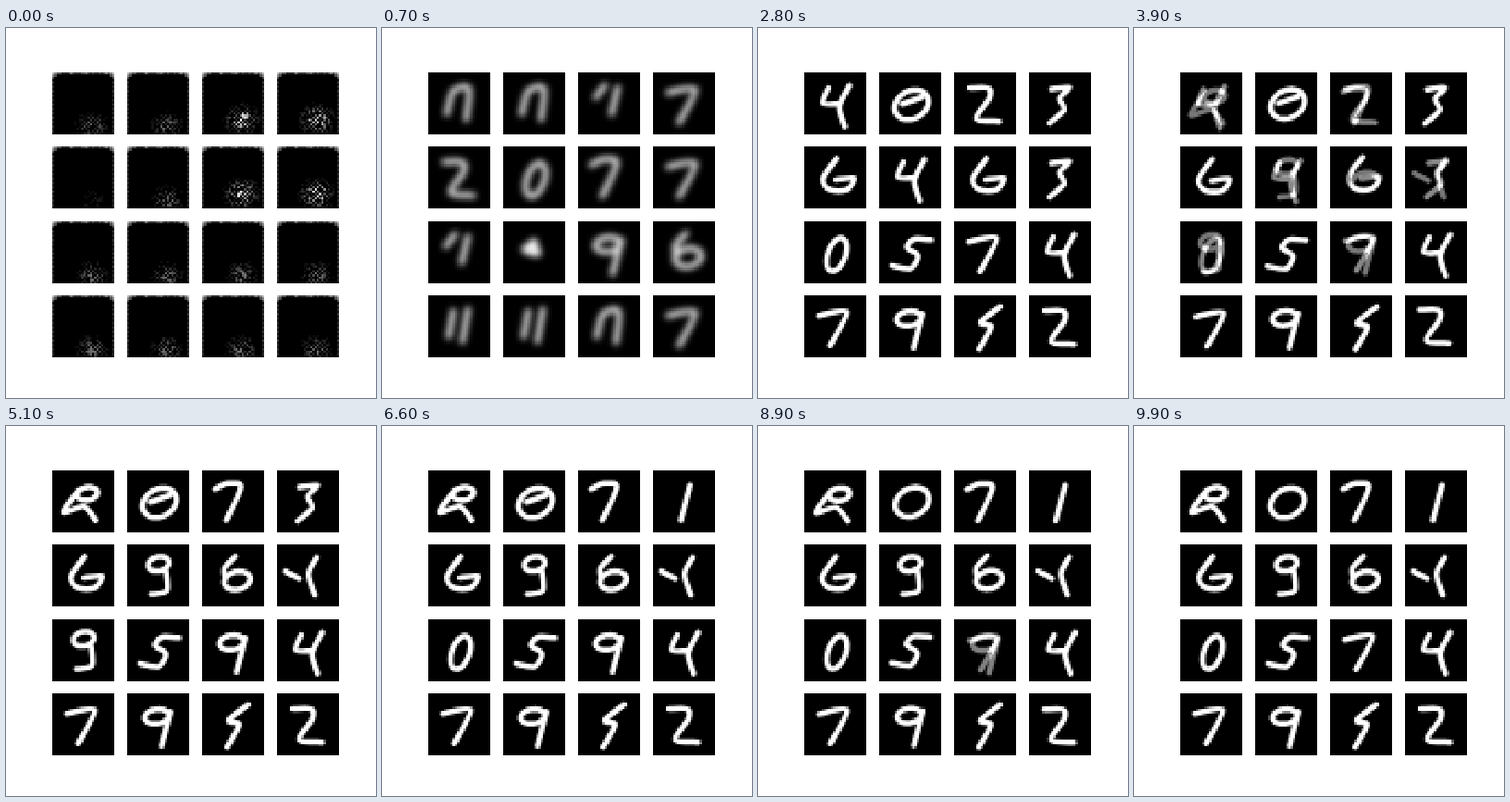
An HTML page with a canvas that plays this animation: 400x400 px, repeating every 10000 ms.

```html
<!DOCTYPE html>
<html lang="en">
<head>
<meta charset="utf-8">
<title>Generated digits</title>
<style>
  html, body { margin: 0; width: 100%; height: 100%; overflow: hidden; background: #fff; }
  canvas { display: block; width: 400px; height: 400px; }
</style>
</head>
<body>
<canvas id="stage" width="400" height="400"></canvas>
<script>
const LOOP = 10000, STEP = 100, CELLS = 28, SIZE = 67;
const stage = document.getElementById('stage').getContext('2d');
const cell = document.createElement('canvas');
cell.width = cell.height = CELLS;
const ctx = cell.getContext('2d');

// Smooth stroke through a few points.
function line(...n) {
  const p = [], path = new Path2D();
  while (n.length) p.push(n.splice(0, 2));
  path.moveTo(...p[0]);
  for (let i = 0; i < p.length - 1; i++) {
    const a = p[i - 1] || p[i], b = p[i], c = p[i + 1], d = p[i + 2] || c;
    path.bezierCurveTo(
      b[0] + (c[0] - a[0]) / 7, b[1] + (c[1] - a[1]) / 7,
      c[0] - (d[0] - b[0]) / 7, c[1] - (d[1] - b[1]) / 7, c[0], c[1]);
  }
  return path;
}

// Ellipse with a handwritten slant.
function ring(cx, cy, rx, ry) {
  const path = new Path2D();
  for (let i = 0; i <= 40; i++) {
    const a = i * Math.PI / 20, y = ry * Math.sin(a);
    path.lineTo(cx + rx * Math.cos(a) - .25 * y, cy + y);
  }
  return path;
}

const shapes = {};
function define(name, ...strokes) {
  shapes[name] = new Path2D();
  strokes.forEach(s => shapes[name].addPath(s));
}

define('0', ring(35, 36, 10, 18));
define('O', ring(35, 35, 18, 16));
define('8', ring(35, 35, 18, 16), line(25, 34, 46, 27));
define('Q', ring(38, 25, 11, 7), line(28, 22, 12, 45, 34, 39, 47, 54));
define('4', line(26, 17, 20, 33, 36, 34), line(49, 14, 38, 37, 44, 59));
define('6', line(35, 13, 20, 35, 28, 47, 46, 47, 54, 34, 34, 36));
define('b', ring(38, 39, 14, 10), line(36, 13, 24, 26, 25, 38));
define('9', ring(32, 25, 13, 8), line(47, 20, 37, 57));
define('g', ring(34, 21, 11, 8), line(42, 28, 43, 50, 26, 54));
define('5', line(56, 20, 38, 19, 30, 28, 42, 37, 34, 51, 14, 48));
define('7', line(16, 22, 46, 18, 28, 54));
define('2', line(14, 20, 28, 14, 42, 18, 26, 54));
define('Z', line(17, 17, 37, 17, 38, 28, 24, 50, 49, 53));
define('3', line(24, 18, 44, 16, 33, 28, 38, 40, 22, 55));
define('1', line(40, 16, 30, 54));
define('A', line(20, 45, 27, 20, 44, 17, 41, 51));
define('"', line(29, 14, 19, 27), line(43, 16, 36, 45));
define('h', line(27, 17, 22, 45), line(43, 15, 37, 50));
define('s', line(50, 12, 29, 29, 40, 34, 27, 58));
define('y', line(43, 14, 34, 32, 41, 55), line(9, 29, 24, 37));
define('e', line(29, 28, 33, 24), line(25, 30, 36, 33));

// One character per tile, rows from top to bottom.
const poses = [
  { time: 1400, glyphs: 'AA"7' + 'Z027' + '"e9b' + 'hhA7' },
  { time: 2800, glyphs: '48Z3' + '6463' + '0574' + '79sZ' },
  { time: 5100, glyphs: 'Q823' + '6gby' + 'g594' + '79sZ' },
  { time: 6600, glyphs: 'Q821' + '6gby' + '0594' + '79sZ' },
  { time: 7900, glyphs: 'QO21' + '6gby' + '0594' + '79sZ' },
  { time: 9900, glyphs: 'QO21' + '6gby' + '0574' + '79sZ' }
];

const clamp = v => Math.max(0, Math.min(1, v));
const ease = v => { v = clamp(v); return v * v * (3 - 2 * v); };
function random(a, b, c = 0) {
  const s = Math.sin(a * 127.1 + b * 311.7 + c * 74.7) * 43758.5453;
  return s - Math.floor(s);
}

function drawGlyph(name, alpha, blur, dx = 0, dy = 0) {
  if (alpha <= 0) return;
  ctx.save();
  ctx.globalCompositeOperation = 'lighter';
  ctx.globalAlpha = alpha;
  ctx.filter = `blur(${blur}px)`;
  ctx.scale(CELLS / SIZE, CELLS / SIZE);
  ctx.translate(dx, dy);
  ctx.lineCap = ctx.lineJoin = 'round';
  ctx.strokeStyle = '#fff';
  ctx.lineWidth = name === 'e' ? 11 : 6;
  ctx.stroke(shapes[name]);
  ctx.restore();
}

// Grey rim and a speckled cloud near the bottom.
function drawNoise(index, alpha) {
  const last = CELLS - 1;
  const bright = index < 8 && index % 4 > 1;
  const strength = bright ? 1 : index === 4 ? .12 : .45;
  for (let y = 0; y < CELLS; y++) {
    for (let x = 0; x < CELLS; x++) {
      const side = Math.min(x, last - x), r = random(x, y, index);
      let v = 0;
      if (y === 0) v = .12 + .4 * random(x, 5);
      if (side === 0) v = Math.max(v, (y % 2 ? .1 : .28) * (.6 + .4 * random(y, 9)));
      if (side + y < 3) v = Math.max(v, .75 - .22 * (side + y));
      const px = (x - 17.5) / 5, py = (y - (bright ? 21 : 24)) / 4.5;
      const cloud = Math.exp(-px * px - py * py);
      if ((x + y) % 2 === 0 || r > .85) v = Math.max(v, 1.15 * strength * cloud * r);
      if (v > .04) {
        ctx.fillStyle = `rgba(255,255,255,${clamp(v) * alpha})`;
        ctx.fillRect(x, y, 1, 1);
      }
    }
  }
}

function drawTile(index, time) {
  ctx.fillStyle = '#000';
  ctx.fillRect(0, 0, CELLS, CELLS);
  const first = poses[0];
  if (time < first.time) {
    drawNoise(index, clamp(1 - time / 500));
    drawGlyph(first.glyphs[index], ease((time - 100) / 700), .4 + 2 * (1 - time / first.time));
  } else {
    const next = poses.findIndex(p => p.time >= time && p !== first);
    const from = poses[next - 1], to = poses[next];
    const k = (time - from.time) / (to.time - from.time);
    const wobble = Math.sin(Math.PI * k) * 2.4;
    const dx = (random(time / STEP, index, 1) - .5) * wobble;
    const dy = (random(time / STEP, index, 2) - .5) * wobble;
    drawGlyph(from.glyphs[index], 1 - ease(k), .4, dx, dy);
    drawGlyph(to.glyphs[index], ease(k), .4, dx, dy);
  }
  const x = 50 + 81 * (index % 4), y = Math.round(48 + 80.35 * Math.floor(index / 4));
  stage.drawImage(cell, x, y, SIZE, SIZE);
}

let shown = -1;
const start = performance.now();
function render() {
  const time = Math.floor((performance.now() - start) % LOOP / STEP) * STEP;
  if (time !== shown) {
    shown = time;
    stage.imageSmoothingEnabled = false;
    stage.fillStyle = '#fff';
    stage.fillRect(0, 0, 400, 400);
    for (let i = 0; i < 16; i++) drawTile(i, time);
  }
  requestAnimationFrame(render);
}
render();
</script>
</body>
</html>
```
